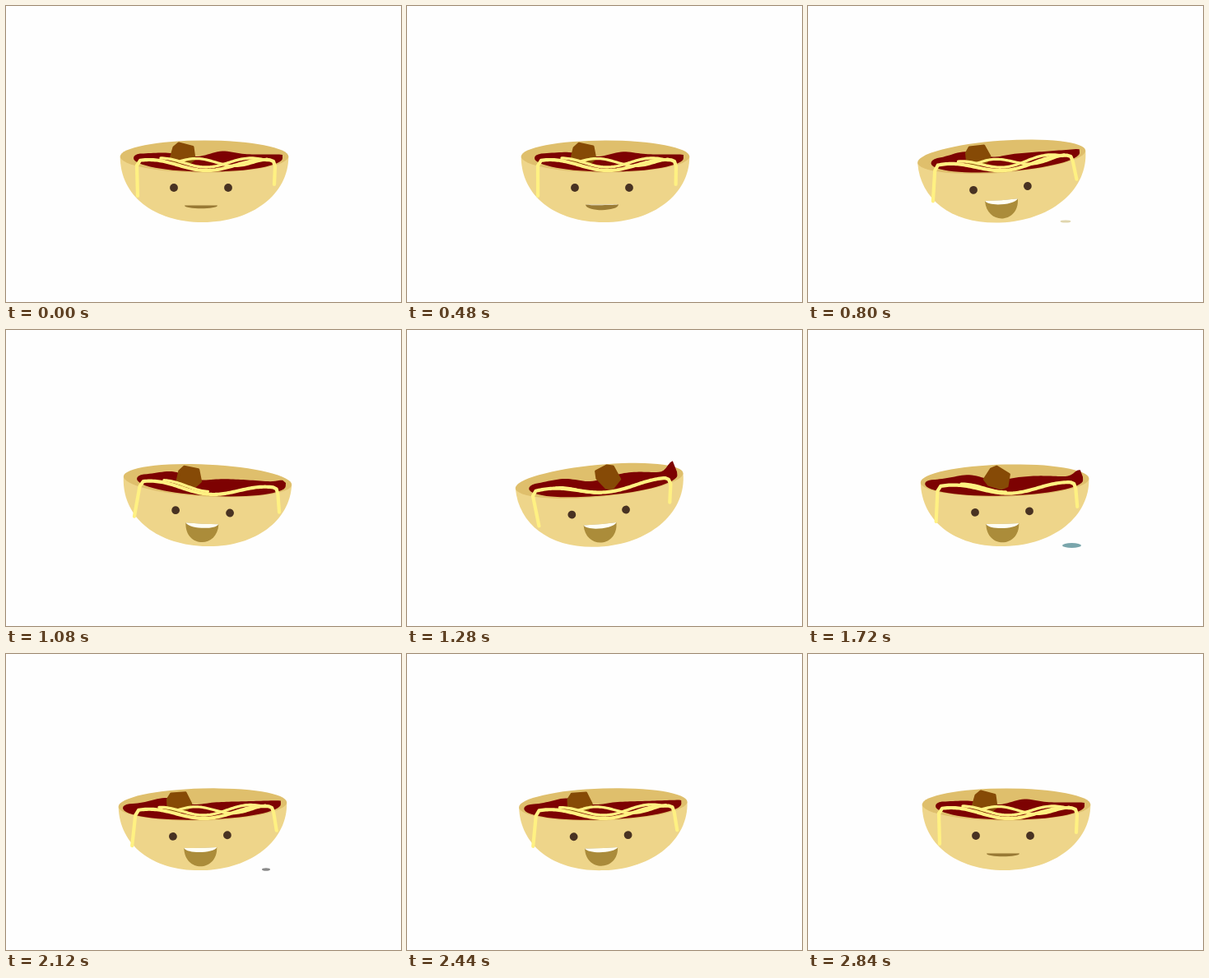
Write an HTML page with a canvas that moves like this. It is 480x360 px and loops after 2880 ms.

```html
<!DOCTYPE html>
<html lang="en">
<head>
<meta charset="utf-8">
<title>Rocking noodle bowl</title>
<style>
  html, body { margin: 0; width: 100%; height: 100%; overflow: hidden; background: #fefefe; }
  canvas { display: block; width: 100%; height: 100%; }
</style>
</head>
<body>
<canvas id="stage" width="480" height="360"></canvas>
<script>
const ctx = document.getElementById('stage').getContext('2d');
const LOOP = 2880, STEP = 40, TAU = Math.PI * 2;
const PIVOT = { x: 241, y: 263 };
const RIM = { x: 241, y: 183, rx: 102.3, ry: 19.5 };
const SWING = { peak: 1420, period: 416, decay: 540, degrees: 13.2 };
const COLOR = {
  back: '#fefefe', bowl: '#eed58a', rim: '#dfbf6c', soup: '#7d0202',
  meat: '#864a06', noodle: '#fff182', eye: '#483222', teeth: '#fffff4'
};

const mix = (a, b, k) => a + (b - a) * k;
const smooth = v => { v = Math.max(0, Math.min(1, v)); return v * v * (3 - 2 * v); };
const bell = (v, center, width) => Math.exp(-(((v - center) / width) ** 2));
const during = (t, from, to, fade) => smooth((t - from) / fade) * (1 - smooth((t - to) / fade));

// Rocking that grows towards one big swing and dies away again
function tilt(t) {
  const d = t - SWING.peak;
  const size = SWING.degrees * Math.exp(-Math.abs(d) / SWING.decay);
  return during(t, 420, 2520, 320) * size * Math.cos(d / SWING.period * TAU) * Math.PI / 180;
}

function poseAt(t) {
  return {
    t,
    tilt: tilt(t),
    life: during(t, 400, 2400, 320),    // how awake the bowl is
    surge: bell(t, 1455, 245),          // contents thrown to the right
    sunk: during(t, 900, 1950, 120),    // loose strands slipping under
    spread: during(t, 1450, 2400, 250)  // soup reaching to the left
  };
}

function disc(x, y, rx, ry, color) {
  ctx.fillStyle = color;
  ctx.beginPath();
  ctx.ellipse(x, y, rx, ry, 0, 0, TAU);
  ctx.fill();
}

function drawPuddles(t) {
  const near = (at, span) => smooth(1.6 * (1 - Math.abs(t - at) / span));
  const spot = (at, x, rx, ry, color) => {
    const k = near(at, 100);
    if (k > 0) disc(x, 262, rx * k, ry * k, color);
  };
  spot(800, 313, 6.5, 1.6, '#e0d6ae');
  spot(1720, 320.5, 11.5, 3, '#7aa6ac');
  spot(2120, 316, 5, 1.8, '#8a8a8a');

  const k = near(1440, 120);
  if (k <= 0) return;
  ctx.save();
  ctx.translate(214, 262);
  ctx.scale(k, k);
  ctx.fillStyle = '#8bc7bd';
  ctx.beginPath();
  ctx.moveTo(-51, 0);
  ctx.quadraticCurveTo(-50, -3, -25, -4);
  ctx.lineTo(-3, -6);
  ctx.lineTo(0, 0);
  ctx.lineTo(-3, 5);
  ctx.quadraticCurveTo(-50, 5, -51, 0);
  ctx.fill();
  ctx.restore();
}

function drawBowl() {
  const { x, y, rx, ry } = RIM;
  ctx.fillStyle = COLOR.bowl;
  ctx.beginPath();
  ctx.moveTo(x - rx, y);
  ctx.bezierCurveTo(x - rx, 231, 180, 263, 239, 263);
  ctx.bezierCurveTo(299, 263, x + rx, 229, x + rx, y);
  ctx.fill();
  disc(x, y, rx, ry, COLOR.rim);
}

function soupLevel(x, { life, surge }) {
  return 180.5
    - 2 * bell(x, 190, 30)
    + 3 * bell(x, 230, 18)
    - 4 * (1 - life) * bell(x, 264, 18)
    - 5 * life * (1 - surge) * bell(x, 198, 22)
    - 7 * surge * bell(x, 280, 30)
    - 13 * Math.min(1, 2 * surge) * bell(x, 332, 9);
}

function drawSoup(pose) {
  const left = 155 - 11 * pose.spread, right = 336;
  const mid = (left + right) / 2;
  ctx.fillStyle = COLOR.soup;
  ctx.beginPath();
  ctx.moveTo(left, 185);
  ctx.quadraticCurveTo(left, 181, left + 8, soupLevel(left + 8, pose));
  for (let x = left + 12; x < right - 2; x += 3) ctx.lineTo(x, soupLevel(x, pose));
  ctx.lineTo(right, 181);
  ctx.ellipse(mid, 185, right - mid, 16.5, 0, 0, Math.PI);
  ctx.fill();
}

function drawMeat({ life, surge }) {
  const lump = [[-15, 8], [-11, -6], [-5, -11], [12, -6.5], [14, 8], [8, 13], [-8, 13]];
  ctx.save();
  ctx.translate(215 - 4 * life + 71 * surge, 178);
  ctx.rotate(-0.3 * life + 2 * surge);
  ctx.fillStyle = ctx.strokeStyle = COLOR.meat;
  ctx.lineWidth = 3;
  ctx.beginPath();
  lump.forEach(p => ctx.lineTo(...p));
  ctx.closePath();
  ctx.fill();
  ctx.stroke();
  ctx.restore();
}

function wave(from, to, trough, period, mid, height) {
  for (let x = from; x <= to; x += 2) {
    ctx.lineTo(x, mid + height * Math.cos((x - trough) / period * TAU));
  }
}

function strand(width, trace) {
  ctx.lineWidth = width;
  ctx.beginPath();
  trace();
  ctx.stroke();
}

function drawNoodles({ life, surge, sunk }) {
  const pull = surge * surge;
  ctx.strokeStyle = COLOR.noodle;
  strand(3.4, () => wave(188, mix(314, 243, sunk), 243, 110, 190.5 + 3 * surge, 5.5));
  strand(3.2, () => wave(211, mix(317, 210, sunk), 278, 94, 190, 4.5));
  strand(4.2, () => {
    ctx.moveTo(160 - 6 * life + 25 * pull, 231);
    ctx.lineTo(159, 194);
    wave(163, 321, 244 + 8 * surge, 140, 193.5 - 2 * surge, 6.5 - 2 * surge);
    ctx.lineTo(325, 189);
    ctx.lineTo(327, 195);
    ctx.lineTo(326 + 4 * life - 17 * pull, 217);
  });
}

function drawFace({ life }) {
  disc(204, 221, 4.9, 4.9, COLOR.eye);
  disc(270, 221, 4.9, 4.9, COLOR.eye);

  const top = mix(242.5, 235.3, life), depth = mix(3.8, 22.8, life) * 4 / 3;
  ctx.fillStyle = `rgb(${mix(152, 171, life)}, ${mix(121, 140, life)}, ${mix(52, 58, life)})`;
  ctx.beginPath();
  ctx.moveTo(217, top);
  ctx.bezierCurveTo(217, top + depth, 257, top + depth, 257, top);
  ctx.quadraticCurveTo(237, top + life, 217, top);
  ctx.fill();

  ctx.fillStyle = COLOR.teeth;
  ctx.beginPath();
  ctx.moveTo(217, top);
  ctx.bezierCurveTo(221, top + 7.5 * life, 253, top + 7.5 * life, 257, top);
  ctx.quadraticCurveTo(237, top + life, 217, top);
  ctx.fill();
}

function draw(t) {
  const pose = poseAt(t);
  ctx.fillStyle = COLOR.back;
  ctx.fillRect(0, 0, 480, 360);
  drawPuddles(t);
  ctx.save();
  ctx.lineCap = ctx.lineJoin = 'round';
  ctx.translate(PIVOT.x, PIVOT.y);
  ctx.rotate(pose.tilt);
  ctx.translate(-PIVOT.x, -PIVOT.y);
  drawBowl();
  drawSoup(pose);
  drawMeat(pose);
  drawNoodles(pose);
  drawFace(pose);
  ctx.restore();
}

function tick() {
  const t = performance.now() % LOOP;
  draw(Math.floor(t / STEP) * STEP);
  requestAnimationFrame(tick);
}
tick();
</script>
</body>
</html>
```
